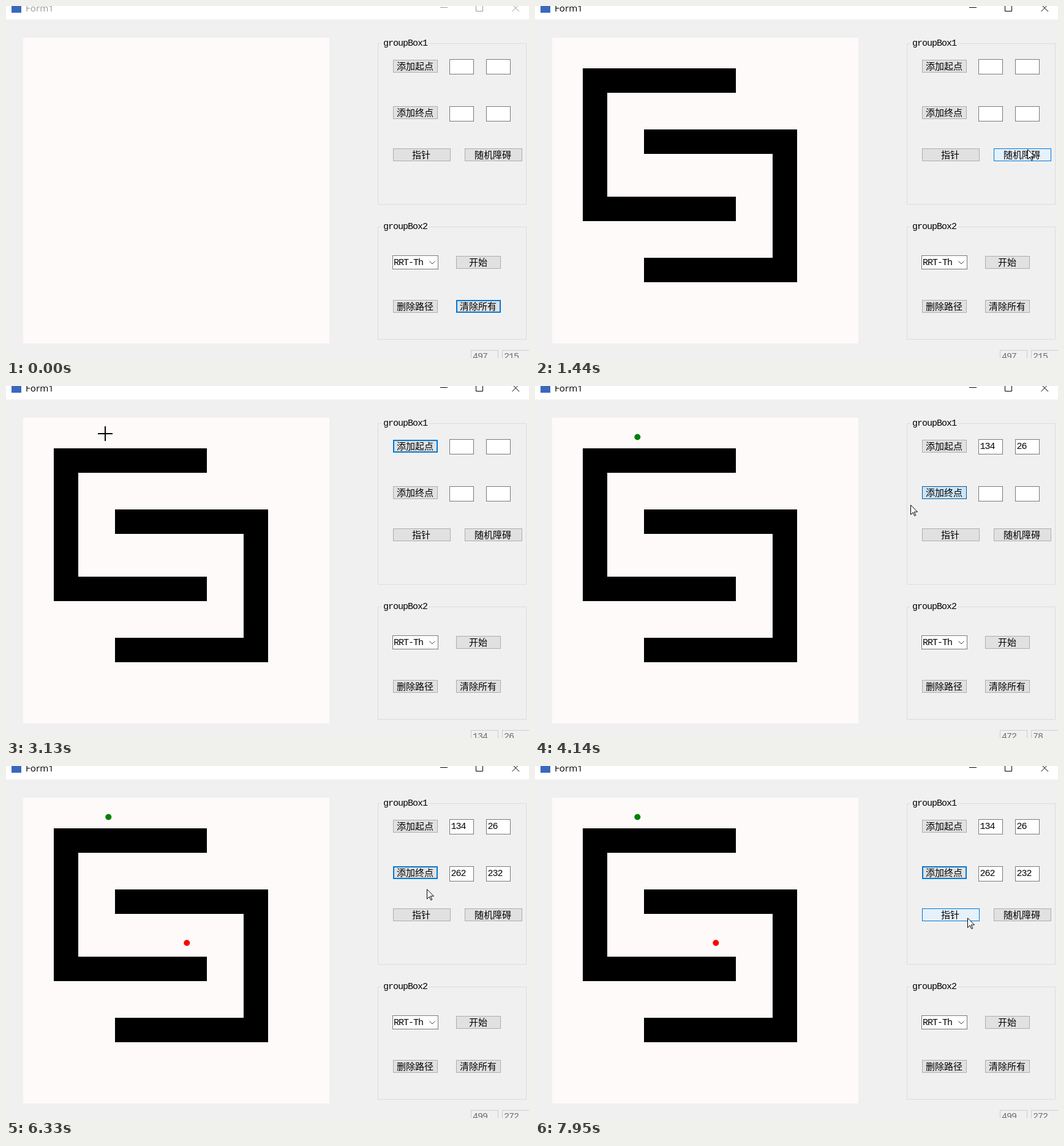
An HTML page that plays this animation: 854 px wide and 576 px high, repeating every 8000 ms.

```html
<!DOCTYPE html>
<html lang="zh">
<head>
<meta charset="utf-8">
<title>Form1</title>
<style>
html, body { margin: 0; width: 100%; height: 100%; overflow: hidden; background: #f0f0f0; }
svg { display: block; width: 854px; height: 576px; isolation: isolate; }
text { white-space: pre; }
.mono { font: 15px "Liberation Mono", "DejaVu Sans Mono", monospace; letter-spacing: -1px; }
.cjk { font: 15px "Noto Sans CJK SC", "Noto Sans CJK", sans-serif; text-anchor: middle; }
.title { font: 15.2px "Open Sans", "Noto Sans", sans-serif; }
</style>
</head>
<body>
<svg id="stage" viewBox="0 0 854 576"></svg>
<script>
const LOOP = 8000, STEP = 76.7;
const stage = document.getElementById('stage');

function set(el, attrs) {
  for (const k in attrs) el.setAttribute(k, attrs[k]);
}
function add(tag, attrs) {
  const el = document.createElementNS('http://www.w3.org/2000/svg', tag);
  set(el, attrs);
  return stage.appendChild(el);
}
function rect(x, y, width, height, fill) {
  return add('rect', { x, y, width, height, fill });
}
function outline(x, y, w, h, fill, stroke) {
  return add('rect', { x: x + .5, y: y + .5, width: w - 1, height: h - 1, fill, stroke });
}
function label(cls, x, y, str, fill = '#000') {
  const el = add('text', { class: cls, x, y, fill });
  el.textContent = str;
  return el;
}
function mix(a, b, p) {
  return 'rgb(' + a.map((v, i) => Math.round(v + (b[i] - v) * p)) + ')';
}
const show = (el, on) => el.setAttribute('visibility', on ? 'visible' : 'hidden');

// Window
rect(0, 0, 854, 576, '#f0f0f0');
rect(0, 0, 854, 22, '#fff');
rect(9, -5, 16, 16, '#3a68bd');
const title = label('title', 32, 9, 'Form1');
const sysIcons = add('path', {
  d: 'M709 2.5h12M767.5 -3.5h11v12h-11zM826.5 -2.5l11.5 11.5M838 -2.5l-11.5 11.5', fill: 'none'
});

// Drawing area
const board = { x: 28, y: 52, w: 500, h: 500 };
rect(board.x, board.y, board.w, board.h, '#fffafa');
const walls = add('path', {
  d: 'M78 102h250v40H118v170h210v40H78zM178 202h250v250H178v-40h210V242H178z',
  'shape-rendering': 'crispEdges'
});
const dot = (x, y, fill) =>
  add('circle', { cx: board.x + x + 5.3, cy: board.y + y + 5.5, r: 5, fill });
const startDot = dot(134, 26, '#008000');
const goalDot = dot(262, 232, '#f00');

// Group boxes
function group(y, h, str) {
  outline(607, y, 243, h, 'none', '#dcdcdc');
  rect(613, y - 1, 77, 3, '#f0f0f0');
  label('mono', 616, y + 4, str);
}
group(61, 264, 'groupBox1');
group(361, 185, 'groupBox2');

// Controls
const controls = [];
function button(x, y, w, str) {
  const box = outline(x, y, w, 21, '#e1e1e1', '#adadad');
  label('cjk', Math.floor(x + w / 2 - .5), y + 16, str);
  const c = { x, y, w, h: 21, box, fadeIn: .6, fadeOut: .5 };
  controls.push(c);
  return c;
}
function field(x, y) {
  const box = outline(x, y, 40, 25, '#fff', '#7a7a7a');
  const text = label('mono', x + 2.5, y + 16, '');
  const c = { x, y, w: 40, h: 25, box, text, fadeIn: 1, fadeOut: .1 };
  controls.push(c);
  return c;
}
const startBtn = button(632, 88, 73, '添加起点');
const goalBtn = button(632, 164, 73, '添加终点');
button(632, 233, 94, '指针');
const wallBtn = button(749, 233, 94, '随机障碍');
button(735, 409, 73, '开始');
button(632, 481, 73, '删除路径');
const clearBtn = button(735, 481, 73, '清除所有');
const startX = field(724, 87), startY = field(784, 87);
const goalX = field(724, 164), goalY = field(784, 164);

outline(631, 408, 75, 23, '#fff', '#7a7a7a');
label('mono', 633, 424, 'RRT-Th');
add('path', { d: 'M691.5 417.5l4.5 4.5l4.5 -4.5', fill: 'none', stroke: '#444' });

const [posX, posY] = [759, 810].map(x => {
  outline(x, 563, 45, 25, '#f0f0f0', '#ccc');
  return label('mono', x + 3, 578, '', '#6d6d6d');
});

// Pointers
const arrow = add('path', {
  d: 'M.5 .8v15.7l3.7 -3.6l2.6 5.6l2 -.9l-2.6 -5.6h5.3z', fill: '#fff', stroke: '#000'
});
const cross = add('path', {
  d: 'M-12 0h24M0 -12v24', stroke: '#fff', 'stroke-width': 2, style: 'mix-blend-mode:difference'
});

// Pointer moves: first and last step in ms, then the points passed
const entry = [704, 394];
const moves = [
  [210, 900, [688, 270], [725, 150], [752, 178], [806, 238], [826, 259]],
  [1060, 1210, [806, 243]],
  [1360, 1520, [803, 230]],
  [1670, 2130, [757, 180], [701, 101]],
  [2290, 3130, [330, 90], [190, 78], [162, 78]],
  [3300, 3910, [200, 86], [500, 130], [668, 174]],
  [4140, 4830, [500, 240], [340, 340], [308, 353], [321, 351]],
  [5000, 5070, [334, 351]],
  [5240, 5540, [290, 284]],
  [5790, 6100, [287, 284], [400, 310], [527, 324]],
  [6170, 6330, [650, 290], [687, 201]],
  [6400, 6560, [732, 262]],
  [6640, 6870, [790, 242]],
  [7100, 7180, [791, 245]],
  [7560, 7950, [706, 248]]
];

// Catmull-Rom curve through the points, p from 0 to 1
function curve(pts, p) {
  const last = pts.length - 1;
  const i = Math.min(last - 1, Math.floor(p * last)), u = p * last - i;
  const at = k => pts[Math.max(0, Math.min(last, k))];
  return [0, 1].map(n => {
    const [a, b, c, d] = [i - 1, i, i + 1, i + 2].map(k => at(k)[n]);
    return Math.round(b + u / 2 * (c - a + u * (2 * a - 5 * b + 4 * c - d
      + u * (3 * (b - c) + d - a))));
  });
}

const inside = (x, y, b) => x >= b.x && x < b.x + b.w && y >= b.y && y < b.y + b.h;
const idle = { t: 0, pos: [497, 215], glow: controls.map(() => 0) };

function buildSteps() {
  const out = [idle];
  function push(t, [x, y]) {
    const prev = out[out.length - 1];
    const onBoard = inside(x, y, board);
    out.push({
      t, x, y, cross: onBoard,
      pos: onBoard ? [x - board.x, y - board.y] : prev.pos,
      glow: controls.map((c, i) => inside(x, y, c)
        ? Math.min(1, prev.glow[i] + c.fadeIn)
        : Math.max(0, prev.glow[i] - c.fadeOut))
    });
  }
  let here = entry;
  moves.forEach(([from, to, ...way], m) => {
    const count = Math.round((to - from) / STEP) + 1;
    for (let k = 1; k <= count; k++) {
      push(Math.floor(from + (to - from) * (k - 1) / (count - 1)), curve([here, ...way], k / count));
    }
    here = way[way.length - 1];
    const next = m + 1 < moves.length ? moves[m + 1][0] : LOOP;
    for (let t = to + STEP; t < next - 20; t += STEP) push(t, here);
  });
  return out;
}
const steps = buildSteps();
const clicks = [[0, clearBtn], [1360, wallBtn], [2290, startBtn], [4140, goalBtn]];

function draw(t) {
  const s = steps.filter(p => p.t <= t).pop();
  const [clickTime, focus] = clicks.filter(c => c[0] <= t).pop();
  const pressed = clickTime > 0 && t < clickTime + 80;
  const ink = t < 1360 ? '#999' : '#000';
  const hasStart = t >= 3300, hasGoal = t >= 5790;

  title.setAttribute('fill', ink);
  sysIcons.setAttribute('stroke', ink);
  show(walls, t >= 1440);
  show(startDot, hasStart);
  show(goalDot, hasGoal);
  startX.text.textContent = hasStart ? '134' : '';
  startY.text.textContent = hasStart ? '26' : '';
  goalX.text.textContent = hasGoal ? '262' : '';
  goalY.text.textContent = hasGoal ? '232' : '';
  [posX.textContent, posY.textContent] = s.pos;

  controls.forEach((c, i) => {
    const g = s.glow[i];
    if (c.text) {
      c.box.setAttribute('stroke', mix([122, 122, 122], [23, 23, 23], g));
      return;
    }
    const on = c === focus, down = on && pressed;
    const line = on && g < .5 && !down ? 2 : 1;
    set(c.box, {
      x: c.x + line / 2, y: c.y + line / 2, width: c.w - line, height: c.h - line,
      'stroke-width': line,
      fill: down ? '#cce4f7' : mix([225, 225, 225], [229, 241, 251], g),
      stroke: down ? '#005499' : on ? '#0078d7' : mix([173, 173, 173], [0, 120, 215], g)
    });
  });

  show(arrow, s !== idle && !s.cross);
  show(cross, s.cross);
  if (s !== idle) (s.cross ? cross : arrow).setAttribute('transform', `translate(${s.x} ${s.y})`);
}

const begin = performance.now();
function tick(now) {
  draw(Math.max(0, now - begin) % LOOP);
  requestAnimationFrame(tick);
}
draw(0);
requestAnimationFrame(tick);
</script>
</body>
</html>
```
